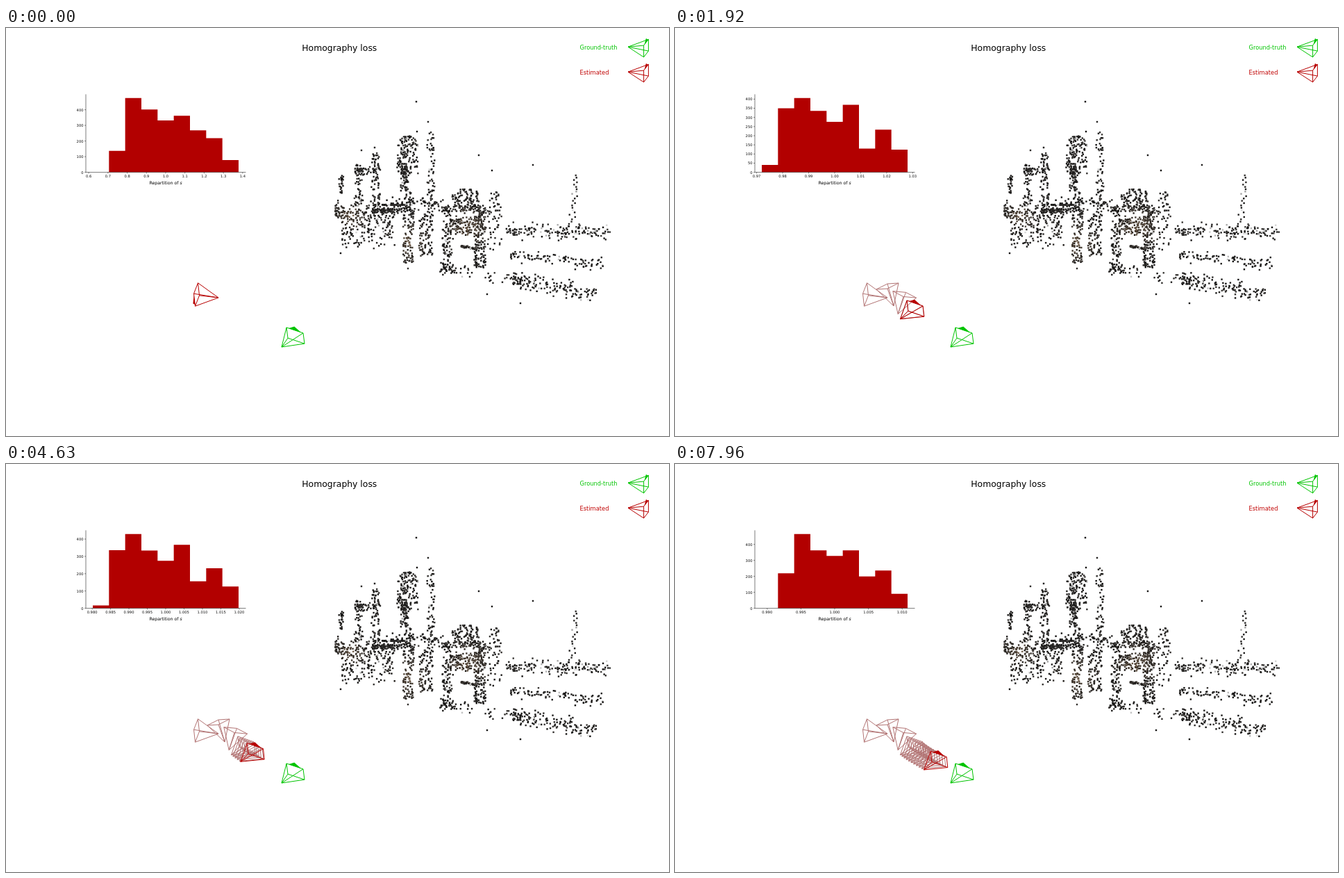
Animation, 955 px wide and 587 px high, one loop 8 s. Source, as an HTML page with a canvas:

```html
<!DOCTYPE html>
<html lang="en">
<head>
<meta charset="utf-8">
<title>Homography loss</title>
<style>
  html, body { margin: 0; width: 100%; height: 100%; overflow: hidden; background: #fff; }
  canvas, svg { position: absolute; left: 0; top: 0; width: 955px; height: 587px; }
  text { font-family: "DejaVu Sans", sans-serif; }
  .ticks { font-size: 5.2px; fill: #111; }
  .axes { fill: none; stroke: #222; stroke-width: .6; }
</style>
</head>
<body>
<canvas id="cloud" width="955" height="587"></canvas>
<svg viewBox="0 0 955 587">
  <text x="480.3" y="32.7" font-size="12.4" text-anchor="middle">Homography loss</text>
  <text x="826.5" y="31.2" font-size="8.3" fill="#00c400">Ground-truth</text>
  <text x="826.5" y="67.2" font-size="8.3" fill="#c00000">Estimated</text>
  <text x="230" y="224.7" font-size="6.2" text-anchor="middle">Repartition of <tspan font-style="italic">s</tspan></text>
  <g id="fixed"></g>
  <g id="live"></g>
</svg>
<script>
const LOOP = 8000, FRAME = 1000 / 24, GHOST_EVERY = 625;
const SNAP = 1333, SETTLED = 1700, END = 7960;
const GREEN = '#00c400', RED = '#b80000', GHOST = '#b27474';
const $ = id => document.getElementById(id);

// ---- Point cloud ----
function seeded(seed) {
  return () => {
    seed = (seed + 0x6D2B79F5) | 0;
    let v = Math.imul(seed ^ seed >>> 15, 1 | seed);
    v ^= v + Math.imul(v ^ v >>> 7, 61 | v);
    return ((v ^ v >>> 14) >>> 0) / 4294967296;
  };
}

function drawCloud() {
  const ctx = $('cloud').getContext('2d'), rnd = seeded(41);
  const noise = () => rnd() + rnd() + rnd() - 1.5;
  const glow = (x, y, cx, cy, r) => Math.exp(-((x - cx) ** 2 + (y - cy) ** 2) / (r * r));

  // Stone warms around the portal and the tower foot and fades towards the far wing.
  function dot(x, y) {
    const warm = Math.max(glow(x, y, 664, 288, 26), glow(x, y, 581, 308, 24), glow(x, y, 495, 272, 18));
    const fade = x > 740 && y < 302 ? .2 : .04;
    const pale = rnd() < fade;
    const light = pale ? 160 + 65 * rnd() : 20 + 45 * rnd() ** 2 + 75 * warm * rnd();
    const tint = pale ? 0 : .25 * warm + .08;
    ctx.fillStyle = `rgb(${[1, 1 - tint / 2, 1 - tint].map(c => Math.round(light * c))})`;
    ctx.fillRect(x - 1.2, y - 1.2, 2.4, 2.4);
  }
  // Upright cluster, narrower near its top
  function tower(cx, top, base, width, n) {
    for (let i = 0; i < n; i++) {
      const k = rnd();
      dot(cx + (rnd() - .5) * width * Math.min(1, .5 + 3 * k) + noise(), top + k * (base - top));
    }
  }
  // Lying cluster, denser on its left
  function band(x0, x1, y, thick, n, slope = 0) {
    for (let i = 0; i < n; i++) {
      const x = x0 + (x1 - x0) * rnd() ** 1.15;
      dot(x, y + slope * (x - x0) + noise() * thick / 2);
    }
  }

  tower(483, 211, 238, 6, 24);
  tower(508, 194, 255, 12, 40);
  tower(532, 180, 255, 13, 60);
  band(503, 540, 205, 16, 55);
  tower(579, 155, 210, 30, 140);
  tower(574, 198, 236, 11, 75);
  tower(580, 236, 338, 16, 135);
  tower(612, 150, 270, 11, 66);
  tower(605, 268, 328, 19, 90);

  band(474, 560, 265, 30, 175);
  band(484, 562, 294, 44, 125);
  band(529, 577, 254.5, 1, 50);
  band(528, 575, 263, 6, 75);
  band(556, 630, 254, 20, 65);

  tower(662, 232, 260, 40, 95);
  band(628, 702, 261, 12, 75);
  tower(636, 262, 352, 14, 95);
  tower(683, 258, 345, 16, 145);
  band(640, 690, 284, 28, 130);
  band(655, 676, 314, 3, 40, .15);
  band(625, 672, 347, 16, 40, .1);
  tower(704, 236, 322, 20, 55);

  for (let floor = 0; floor < 3; floor++)
    band(720 + 4 * floor, 870 - 10 * floor, 293 + 34 * floor, 22 - 4 * floor * (2 - floor),
      [165, 95, 155][floor], floor * .09);
  band(690, 735, 361, 16, 16);
  for (let k = 0; k < 1; k += .045) dot(823 - 9 * k + 5 * noise(), 212 + 74 * k);

  // Lone points above and below the building
  for (const [x, y] of [[591, 106], [608, 135], [592, 149], [681, 183], [759, 197], [700, 205],
    [512, 176], [531, 172], [482, 324], [579, 346], [741, 396], [693, 383]]) dot(x, y);
}

// ---- Motion ----
// Rows hold a time and values; the optimiser converges abruptly after SNAP.
function at(keys, t) {
  let i = 1;
  while (i < keys.length - 1 && keys[i][0] < t) i++;
  const [a, b] = [keys[i - 1], keys[i]];
  let k = Math.min(1, (t - a[0]) / (b[0] - a[0]));
  if (a[0] === SNAP) k = 1 - (1 - k) ** 8;
  return a.slice(1).map((v, j) => v + (b[j + 1] - v) * k);
}

// Camera: apex, then vectors to the image centre, its right edge and its lower edge
const poses = [
  [0, 306, 388, -31.5, -4.5, 1, 9, 3, -7.7],
  [625, 315, 400, -9, -28.5, 8, -4, 8, -.5],
  [SNAP, 322, 413, 12, -28, 9.5, 1.5, 7.5, 4.5],
  [2630, 324, 418, 22, -15, 11.5, 4, .8, 7.6]
];

function poseAt(t) {
  const [x, y, ...axes] = at(poses, t);
  const k = Math.max(0, (t - SETTLED) / (END - SETTLED));
  return [x + 34.5 * k ** 1.2, y + 22 * k, ...axes];
}

function camera([x, y, fx, fy, rx, ry, dx, dy], color, marker = true) {
  const point = (r, d) =>
    `${(x + fx + r * rx + d * dx).toFixed(2)} ${(y + fy + r * ry + d * dy).toFixed(2)}`;
  const corners = [point(-1, -1), point(1, -1), point(1, 1), point(-1, 1)];
  const rays = corners.map(c => `M${x} ${y}L${c}`).join('');
  const up = `M${point(-.75, -1)}L${point(0, -1.7)}L${point(.75, -1)}Z`;
  return `<path d="${rays}M${corners.join('L')}Z" fill="none" stroke="${color}" stroke-linejoin="round"/>` +
    (marker ? `<path d="${up}" fill="${color}"/>` : '');
}

// ---- Histogram: time, axis range, nine bin counts ----
const hist = [
  [0, .832, 0, 137, 475, 402, 332, 362, 268, 218, 78],
  [SNAP, .633, 48, 131, 407, 628, 657, 181, 175, 42, 0],
  [2630, .0567, 40, 352, 406, 333, 273, 371, 129, 235, 125],
  [5630, .0369, 4, 328, 441, 334, 276, 365, 169, 229, 126],
  [END, .0237, 0, 219, 465, 363, 328, 363, 200, 237, 91]
];

function tickStep(range) {
  const base = 10 ** Math.floor(Math.log10(range / 10));
  return [1, 2, 2.5, 5, 10, 20].map(m => m * base).find(s => range / s <= 8.8);
}

function histogram(t) {
  const left = 115, right = 345.5, top = 95.4, bottom = 207.6, middle = 230;
  const binX = i => 125 + i * 210 / 9;
  const [range, ...counts] = at(hist, t);
  const yMax = Math.max(...counts) * 1.05;
  const yOf = v => bottom - v / yMax * (bottom - top);
  const bars = counts.map((n, i) => `V${yOf(n)}H${binX(i + 1)}`).join('');
  let marks = `M${left} ${top}V${bottom}H${right}`, labels = '';

  const xStep = tickStep(range), scale = (right - left) / range;
  const digits = String(+xStep.toPrecision(3)).split('.')[1]?.length ?? 0;
  for (let i = Math.ceil((1 - range / 2) / xStep); i * xStep <= 1 + range / 2; i++) {
    const x = middle + (i * xStep - 1) * scale;
    marks += `M${x} ${bottom}v1.8`;
    labels += `<text x="${x}" y="215.2" text-anchor="middle">${(i * xStep).toFixed(digits)}</text>`;
  }
  const yStep = tickStep(yMax);
  for (let v = 0; v <= yMax; v += yStep) {
    marks += `M${left} ${yOf(v)}h-1.8`;
    labels += `<text x="111.5" y="${yOf(v) + 2}" text-anchor="end">${v}</text>`;
  }
  return `<path d="M${binX(0)} ${bottom}${bars}V${bottom}Z" fill="#b20000"/>` +
    `<path class="axes" d="${marks}"/><g class="ticks">${labels}</g>`;
}

function render(now) {
  const t = Math.floor((now % LOOP + 5) / FRAME) * FRAME;
  let out = histogram(t);
  for (let g = 0; g < t; g += GHOST_EVERY) out += camera(poseAt(g), GHOST, false);
  $('live').innerHTML = out + camera(poseAt(t), RED);
}

drawCloud();
const legendAxes = [26, 1.9, 3.4, -4.4, 0, 8.4];
$('fixed').innerHTML = camera([397, 459, 20, -16.5, 12, 4, 1, 7.6], GREEN) +
  camera([896, 27.2, ...legendAxes], GREEN) + camera([896, 63.2, ...legendAxes], RED);

let start;
function tick(now) {
  start ??= now;
  render(now - start);
  requestAnimationFrame(tick);
}
render(0);
requestAnimationFrame(tick);
</script>
</body>
</html>
```
